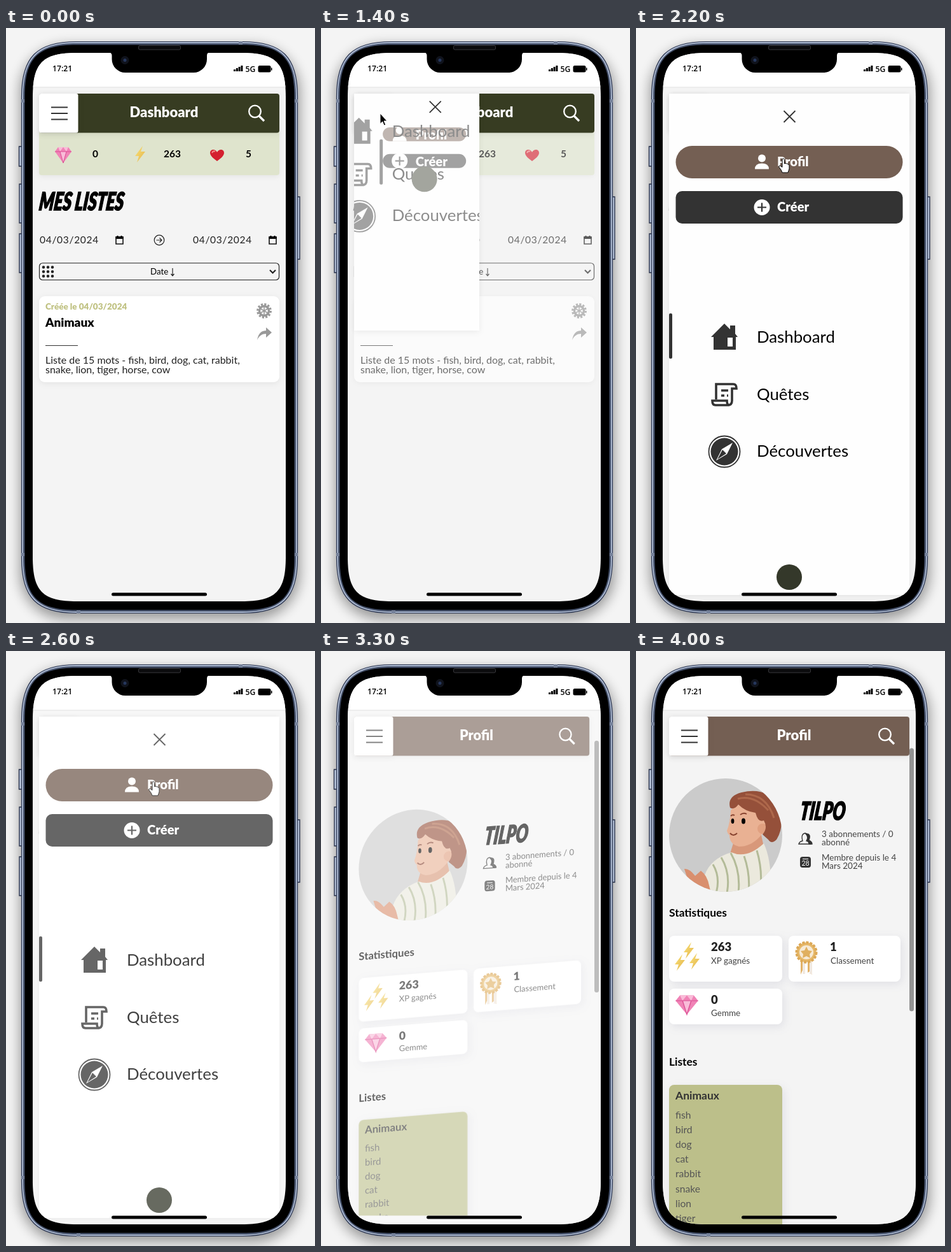
An HTML page for the animation above (4.9 s loop, 486 by 934 pixels).

```html
<!DOCTYPE html>
<html lang="fr">
<head>
<meta charset="utf-8">
<title>Dashboard</title>
<style>
  html, body { margin: 0; width: 100%; height: 100%; overflow: hidden; background: #f4f4f4; }
  svg { display: block; width: 100vw; height: 100vh; font-family: Lato, sans-serif; }
  .b { font-weight: 700; }
  .x { font-weight: 900; }
  .white { fill: #fff; }
  .line { fill: none; stroke: #333; stroke-width: 1.8; }
  .shade { filter: drop-shadow(0 2px 5px #0001); }
  .card { filter: drop-shadow(3px 4px 7px #4a4a7a1c); }
  .title { font-size: 22px; text-anchor: middle; }
  .comic { font-size: 39px; font-weight: 900; font-style: italic; stroke: #000; stroke-width: 1.6; }
  .date { font-size: 15.5px; letter-spacing: .7px; fill: #222; }
  .nav { font-size: 25.8px; }
  .btn { font-size: 20.2px; }
  .small { font-size: 13.5px; fill: #444; }
  .status { font: 600 12.2px "Open Sans", sans-serif; }
</style>
</head>
<body>
<svg viewBox="0 0 486 934" preserveAspectRatio="none">
  <defs>
    <clipPath id="screen"><path id="glass"/></clipPath>
    <clipPath id="panelClip"><rect id="panelBox" x="52" y="103" width="61" height="61"/></clipPath>
    <clipPath id="round"><circle cx="141" cy="289" r="89"/></clipPath>
    <filter id="blur" x="-20%" y="-20%" width="140%" height="140%"><feGaussianBlur stdDeviation="10"/></filter>
    <linearGradient id="gold" x2="1" y2="1"><stop stop-color="#fae27a"/><stop offset="1" stop-color="#e3b44a"/></linearGradient>
    <path id="bolt" d="M4-13L-8 3h6L-5 13 8-4H1Z" fill="url(#gold)"/>
    <g id="gem">
      <path d="M-8-12H8L13-5 0 13-13-5Z" fill="#f083b6"/>
      <path d="M-8-12L-5-5 0-12 5-5 8-12ZM-5-5H5L0 13Z" fill="#f9bcd8"/>
      <path d="M-13-5H13M-5-5L0 13 5-5" fill="none" stroke="#dc4f94"/>
    </g>
    <g id="burger">
      <rect class="shade white" x="52" y="103" width="61.500" height="61.500" rx="3"/>
      <path class="line" d="M71 124.500h26M71 134h26M71 143.500h26"/>
    </g>
    <g id="search" fill="none" stroke="#fff">
      <circle cx="391.500" cy="131" r="9.300" stroke-width="2.300"/>
      <path d="M398 138l8 8" stroke-width="3.200"/>
    </g>
    <g id="calendar">
      <path d="M-5.500-5H5.500V6H-5.500Z" fill="none" stroke="#111" stroke-width="1.600"/>
      <path d="M-6-5.500H6V-2H-6ZM-4-7h2v2h-2ZM2-7h2v2h-2Z"/>
    </g>
  </defs>

  <!-- phone body -->
  <rect width="486" height="934" fill="#f4f4f4"/>
  <rect x="22" y="28" width="440" height="900" rx="72" opacity=".38" filter="url(#blur)"/>
  <path d="M25 186h-4.500v31h4.500ZM25 245h-4v61h4ZM25 323h-4v61h4ZM458 265h4v98h-4Z" fill="#b3c0d6" stroke="#27304a" stroke-width="1.300"/>
  <path id="edge" fill="#aebbd2" stroke="#2b3550" stroke-width="1.200"/>
  <path id="rim" fill="#46526c"/>
  <path d="M366 21h6v5h-6ZM111 914h6v5h-6ZM24 112h5v5h-5ZM24 824h5v5h-5ZM454 112h5v5h-5ZM454 824h5v5h-5Z" fill="#75819a"/>
  <path id="bezel"/>
  <rect x="208.500" y="27.500" width="66" height="6.500" rx="2" fill="#0b0b0d" stroke="#39393d"/>

  <g clip-path="url(#screen)">
    <rect x="42" y="39" width="398" height="861" fill="#f4f4f4"/>

    <g id="home">
      <g id="content">
        <rect class="shade" x="52" y="160" width="378" height="71" rx="4" fill="#dfe4cd"/>
        <use href="#gem" x="90" y="199"/>
        <use href="#bolt" x="211" y="198"/>
        <path transform="translate(332 200)" d="M0 9C-5 5-11 1-11-4C-11-10-3-11 0-5C3-11 11-10 11-4C11 1 5 5 0 9Z" fill="#d4202f"/>
        <path d="M324 196q2-4 5-2" fill="none" stroke="#f58a8a" stroke-width="2"/>
        <g class="b" font-size="15.500"><text x="136" y="203">0</text><text x="248" y="203">263</text><text x="377" y="203">5</text></g>
        <text class="comic" transform="translate(51 286) skewX(-7) scale(.67 1)">MES LISTES</text>
        <text class="date" x="53" y="338">04/03/2024</text>
        <text class="date" x="294" y="338">04/03/2024</text>
        <use href="#calendar" x="178.500" y="333"/>
        <use href="#calendar" x="419.500" y="333"/>
        <g fill="none" stroke="#222" stroke-width="1.200">
          <circle cx="241" cy="333" r="7.800"/><path d="M236.500 333h8.500m-3.500-3.500l3.500 3.500-3.500 3.500"/>
          <rect x="52.500" y="369" width="377" height="26.500" rx="5"/>
          <path d="M262 377v12m-2.500-3l2.500 3 2.500-3"/>
          <path d="M415 380l4.500 4.500 4.500-4.500" stroke-width="2.200"/>
          <path d="M59 375.500h15M59 382.500h15M59 389.500h15" stroke-width="4.600" stroke-linecap="round" stroke-dasharray="0 7"/>
        </g>
        <text x="227" y="387" font-size="13.300">Date</text>
        <rect class="shade white" x="52" y="421" width="378" height="135" rx="9"/>
        <text class="x" x="62" y="442" font-size="13.500" fill="#c0c283">Créée le 04/03/2024</text>
        <text class="x" x="62" y="469" font-size="19">Animaux</text>
        <path class="line" d="M62 498.500h51" style="stroke-width:1.200"/>
        <g font-size="16" fill="#222">
          <text x="62" y="527">Liste de 15 mots - fish, bird, dog, cat, rabbit,</text>
          <text x="62" y="542">snake, lion, tiger, horse, cow</text>
        </g>
        <g transform="translate(406 444)" fill="none" stroke="#999">
          <circle r="10.300" stroke-width="3.200" stroke-dasharray="3.100 2.290"/>
          <circle r="7.500" stroke-width="3.400"/>
          <path d="M0-7V7M-6-3.500L6 3.500M-6 3.500L6-3.500" stroke-width="1.600"/>
        </g>
        <path transform="translate(406 480)" d="M-11 10C-9-2-3-5 3-5v-5L12-2 3 6V0C-3 0-8 3-11 10Z" fill="#999"/>
      </g>
      <rect class="shade" x="52" y="103" width="378" height="61.500" rx="4" fill="#373c22"/>
      <text class="x title white" x="248.500" y="140">Dashboard</text>
      <use href="#search"/>
      <use href="#burger"/>
    </g>

    <g id="panel" class="shade">
      <g clip-path="url(#panelClip)">
        <rect x="52" y="103" width="378" height="787" fill="#fefefe"/>
        <path id="close" class="line" d="M-9-9L9 9M9-9L-9 9"/>
        <g id="items">
          <g id="profileBtn">
            <rect fill="#745f53"/>
            <g class="white"><circle cy="-6" r="6"/><path d="M-11 11Q-11 2 0 2T11 11Z"/></g>
            <text class="x btn white">Profil</text>
          </g>
          <g id="createBtn">
            <rect fill="#333"/>
            <g><circle class="white" r="12.500"/><path class="line" d="M-7 0H7M0-7V7" style="stroke-width:2.200"/></g>
            <text class="x btn white">Créer</text>
          </g>
          <rect id="mark" width="5" height="71" rx="2" fill="#333"/>
          <g id="house" fill="#333">
            <path d="M-21 0L0-21 9-12V-18H17V-5L21 0H18V20H-17V0Z"/><path class="white" d="M5 1h8v14H5Z"/>
          </g>
          <g id="scroll" class="line" style="stroke-width:3.600">
            <path d="M-13 8V-16H14Q19-16 19-9H12V10Q12 17 5 17H-14Q-19 17-19 10H4Q4 17 8 17M-5-6H6M-5 2H0M4 2H6"/>
          </g>
          <g id="compass">
            <circle r="24.500" class="line"/><circle r="21.500" fill="#333"/>
            <path class="white" d="M13-14L4 4-13 14-4-4Z"/><path d="M-11 12L-3-3 3 3Z" fill="#333"/>
          </g>
          <text id="nav0" class="nav">Dashboard</text>
          <text id="nav1" class="nav">Quêtes</text>
          <text id="nav2" class="nav">Découvertes</text>
          <circle id="emblem" r="20" fill="#34382a"/>
        </g>
      </g>
    </g>

    <g id="cursor">
      <path id="arrow" d="M0 0V16.500L3.700 13 6.200 19 8.700 18 6.200 12H11Z" stroke="#fff"/>
      <path id="hand" class="white" stroke="#000" d="M-2 1.500Q-2 0-.3 0T1.500 1.500V8Q3 6.500 4.500 8 6 7 7 9 9 8.500 9 11V16Q8 19 7 22H-2Q-3 18-7 13.500-8 11-5.500 11L-2 13.500Z"/>
    </g>
    <rect id="veil" class="white" x="42" y="93" width="398" height="807"/>

    <g id="profile">
      <rect x="42" y="93" width="398" height="807" fill="#f4f4f4"/>
      <g id="hero">
        <circle cx="141" cy="289" r="89" fill="#cbcbcb"/>
        <g clip-path="url(#round)">
          <path d="M156 292L196 284 202 312Q172 338 148 318Z" fill="#d8987a"/>
          <path d="M108 352Q117 326 150 316Q174 327 201 302Q214 330 212 380H104Z" fill="#ebe9dd"/>
          <path d="M121 335q12 20 5 45M134 324q15 25 9 56M149 317q16 28 12 63M170 322q10 28 7 58M190 313q10 33 5 67" fill="none" stroke="#b3bb98" stroke-width="3"/>
          <path d="M76 342Q84 341 93 353L102 345Q112 352 115 368L118 380H88Z" fill="#d98f6e"/>
          <path d="M149 250Q148 270 143 282Q144 287 147 289Q147 304 162 307Q188 307 206 276L192 245Q165 232 149 250Z" fill="#e9b193"/>
          <circle cx="199" cy="279" r="8" fill="#e0a080"/>
          <path d="M148 246Q143 228 166 222Q204 213 222 240Q236 272 221 296Q213 304 208 296L199 288Q208 278 201 266Q192 270 188 254Q172 252 161 241Q154 250 148 246Z" fill="#95503a"/>
          <path d="M160 232Q185 225 208 250M172 225Q205 225 217 262" fill="none" stroke="#ae684b" stroke-width="3"/>
          <ellipse cx="152" cy="267" rx="2.400" ry="4"/><ellipse cx="169" cy="267" rx="3" ry="4.500"/>
          <path d="M149 259q3-3 6-1M164 257q5-4 10-1M148 286q5 6 11 0" fill="none" stroke="#87432f" stroke-width="2"/>
        </g>
        <text class="comic" transform="translate(257 265) skewX(-7) scale(.67 1)">TILPO</text>
        <g transform="translate(266 295)" class="line" style="stroke-width:1.300">
          <path d="M-10 8Q-9 4-4 3Q-7-8 0-9Q6-8 3 3Q8 4 9 8Z"/>
          <path d="M1-8Q10-9 6 2Q11 4 11 8H6Q6 4 2 3Q6-3 1-8Z" fill="#333"/>
        </g>
        <rect x="258" y="323" width="17" height="17" rx="4" fill="#333"/>
        <text class="white" x="266.500" y="337" font-size="10.500" text-anchor="middle">28</text>
        <path d="M262 326.500h9" stroke="#ccc" stroke-width="1.500"/>
        <g class="small">
          <text x="292" y="292">3 abonnements / 0</text><text x="292" y="305">abonné</text>
          <text x="292" y="329">Membre depuis le 4</text><text x="292" y="342">Mars 2024</text>
        </g>
      </g>
      <g id="stats">
        <g class="b" font-size="17.400"><text x="52" y="417">Statistiques</text><text x="52" y="651">Listes</text></g>
        <g class="card white">
          <rect x="52" y="447" width="178" height="72" rx="8"/>
          <rect x="240" y="447" width="176" height="72" rx="8"/>
          <rect x="52" y="530" width="178" height="56" rx="8"/>
        </g>
        <use href="#bolt" x="69" y="489"/><use href="#bolt" x="83" y="470"/><use href="#bolt" x="92" y="487"/>
        <use href="#gem" transform="translate(80 555) scale(1.360 1.200)"/>
        <path d="M259 482h7v21l-4-2-3 7ZM270 482h7v26l-4-5-3 2Z" fill="#e2b269"/>
        <path d="M262 485h4v22h-4ZM273 485h4v22h-4Z" fill="#f1e9e0"/>
        <circle cx="268" cy="473" r="15.500" fill="#e6b869" stroke="#dca856" stroke-width="4" stroke-dasharray="4 2"/>
        <circle cx="268" cy="473" r="11" fill="#f6ead6"/>
        <path d="M268 464l3 6 6 1-4 5 1 6-6-3-6 3 1-6-4-5 6-1Z" fill="#e0b060"/>
        <g class="x" font-size="18.500" fill="#222"><text x="118" y="471">263</text><text x="305" y="471">1</text><text x="118" y="554">0</text></g>
        <g class="small"><text x="118" y="491">XP gagnés</text><text x="306" y="491">Classement</text><text x="118" y="573">Gemme</text></g>
        <rect class="card" x="52" y="681" width="178" height="260" rx="8" fill="#bcbf8a"/>
        <text class="b" x="62" y="704" font-size="17.500" fill="#333">Animaux</text>
        <g id="words" font-size="15.600" fill="#555"></g>
      </g>
      <rect id="foot" x="42" width="398" height="40" fill="#f4f4f4"/>
      <g id="bar">
        <rect class="shade" x="52" y="103" width="378" height="61.500" rx="4" fill="#745f53"/>
        <text class="x title white" x="248.500" y="140">Profil</text>
        <use href="#search"/>
      </g>
      <use href="#burger"/>
      <rect id="thumb" x="430" width="7" rx="3.500" fill="#929292"/>
    </g>

    <!-- status bar -->
    <path d="M42 39h398v53.500H42Z" class="white"/>
    <path d="M42 93h398" stroke="#e2e2e2"/>
    <path d="M162 38H320Q316 39 316 43V49A21 21 0 0 1 295 70H187.500A21 21 0 0 1 166.500 49V43Q166.500 39 162 38Z"/>
    <circle cx="187" cy="50.500" r="6.500" fill="#10131c"/><circle cx="187" cy="50.500" r="2.500" fill="#26375c"/>
    <text class="status" x="73" y="68">17:21</text>
    <text class="status" x="376.500" y="69">5G</text>
    <path d="M358 65h3v3h-3ZM361.800 63h3v5h-3ZM365.600 61h3v7h-3ZM369.400 59h3v9h-3ZM417 62.500h1.500v4H417Z"/>
    <rect x="396.500" y="59" width="20" height="10.500" rx="2.500"/>
    <rect x="166" y="886.500" width="150" height="5" rx="2.500"/>
  </g>
</svg>
<script>
const $ = id => document.getElementById(id);
const clamp = v => Math.max(0, Math.min(1, v));
const mix = (a, b, k) => a + (b - a) * k;
const place = (el, x, y) => el.setAttribute('transform', `translate(${x} ${y})`);
const set = (el, attrs) => { for (const k in attrs) el.setAttribute(k, attrs[k]); };
const show = (id, on) => $(id).style.display = on ? '' : 'none';

const LOOP = 4900, STEP = 100;

// Box with smooth corners: each starts e before the corner, with handles h from it.
function smoothBox(id, x, y, w, h, e, k) {
  const r = x + w, b = y + h;
  set($(id), { d: `M${x} ${y + e}C${x} ${y + k} ${x + k} ${y} ${x + e} ${y}
    H${r - e}C${r - k} ${y} ${r} ${y + k} ${r} ${y + e}
    V${b - e}C${r} ${b - k} ${r - k} ${b} ${r - e} ${b}
    H${x + e}C${x + k} ${b} ${x} ${b - k} ${x} ${b - e}Z` });
}
smoothBox('edge', 24.5, 21.5, 434, 897, 86, 24);
smoothBox('rim', 27, 24, 429, 892, 84, 23);
smoothBox('bezel', 29.5, 26.5, 424, 887, 81, 20.5);
smoothBox('glass', 42, 39, 398, 861, 70, 15.5);

// id, half-open x y, fully open x y
const parts = [
  ['close', 180, 124, 241.5, 139], ['mark', 92, 176, 52, 448],
  ['house', 60, 163, 139, 485], ['scroll', 60, 231, 139, 575], ['compass', 61, 297, 139, 665],
  ['nav0', 112, 172, 190, 494], ['nav1', 112, 239, 190, 584], ['nav2', 112, 305, 190, 673],
  ['emblem', 163, 240, 241, 862]
];
// id, half-open top, open top, open radius
const buttons = [['profileBtn', 156, 185, 25.5], ['createBtn', 198, 256, 10]];

// time, x, y
const track = [
  [100, 486, 345], [200, 385, 290], [300, 300, 243], [400, 232, 206], [500, 182, 179], [600, 148, 160],
  [700, 116, 143], [800, 97, 135], [900, 97, 135], [1000, 93, 134], [1900, 93, 134],
  [2000, 128, 152], [2100, 192, 185], [2200, 232, 205], [LOOP, 232, 205]
];

'fish bird dog cat rabbit snake lion tiger'.split(' ').forEach((word, i) => {
  const text = document.createElementNS('http://www.w3.org/2000/svg', 'text');
  set(text, { x: 62, y: 734 + 23.1 * i });
  text.textContent = word;
  $('words').append(text);
});

function drawMenu(t) {
  const open = 1 - (1 - clamp((t - 1300) / 500)) ** 2.5;
  const k = (open - .43) / .57;
  show('panel', open > 0);
  $('content').style.opacity = 1 - .85 * open;
  set($('panelBox'), { width: mix(61, 378, open), height: mix(61, 787, open) });
  $('items').style.opacity = mix(.45, 1, k);
  for (const [id, x0, y0, x1, y1] of parts) place($(id), mix(x0, x1, k), mix(y0, y1, k));
  for (const [id, top0, top1, r] of buttons) {
    const [box, icon, label] = $(id).children;
    const y = mix(top0, top1, k), h = mix(22, 51, k);
    set(box, { x: mix(97, 62.5, k), y, width: mix(132, 357, k), height: h, rx: mix(11, r, k) });
    place(icon, mix(124, 198, k), y + h / 2);
    place(label, mix(149, 222, k), y + h / 2 + mix(8, 6, k));
  }
}

function drawCursor(t) {
  show('cursor', t >= 100 && t < 2900);
  const i = Math.max(1, track.findIndex(p => p[0] >= t));
  const [a, b] = [track[i - 1], track[i]];
  const k = clamp((t - a[0]) / (b[0] - a[0]));
  place($('cursor'), mix(a[1], b[1], k), mix(a[2], b[2], k));
  const hand = t >= 800 && t < 1400 || t >= 2200;
  show('hand', hand);
  show('arrow', !hand);
}

// The page swings in flat: r is the remaining tilt.
function drawProfile(t) {
  const r = clamp((4000 - t) / 1000) ** 2 * 4;
  show('profile', t >= 3100);
  $('profile').style.opacity = clamp((t - 3000) / 500);
  const tilt = (id, b, d, f) =>
    set($(id), { transform: `matrix(${1 - .02 * r} ${b * r} 0 ${1 + d * r} ${4.8 * r} ${f * r})` });
  tilt('hero', -.036, -.012, 32.5);
  tilt('stats', -.04, -.025, 47.4);
  set($('bar'), { transform: `translate(52 0) scale(${1 - .0106 * r} 1) translate(-52 0)` });
  set($('thumb'), { y: 152.5 - 6 * r, height: 413 - 9 * r });
  set($('foot'), { y: 900 - 7 * r });
}

function frame() {
  const t = Math.floor(performance.now() % LOOP / STEP) * STEP;
  drawMenu(t);
  drawCursor(t);
  $('veil').style.opacity = clamp((t - 2500) / 400);
  drawProfile(t);
  requestAnimationFrame(frame);
}
frame();
</script>
</body>
</html>
```
